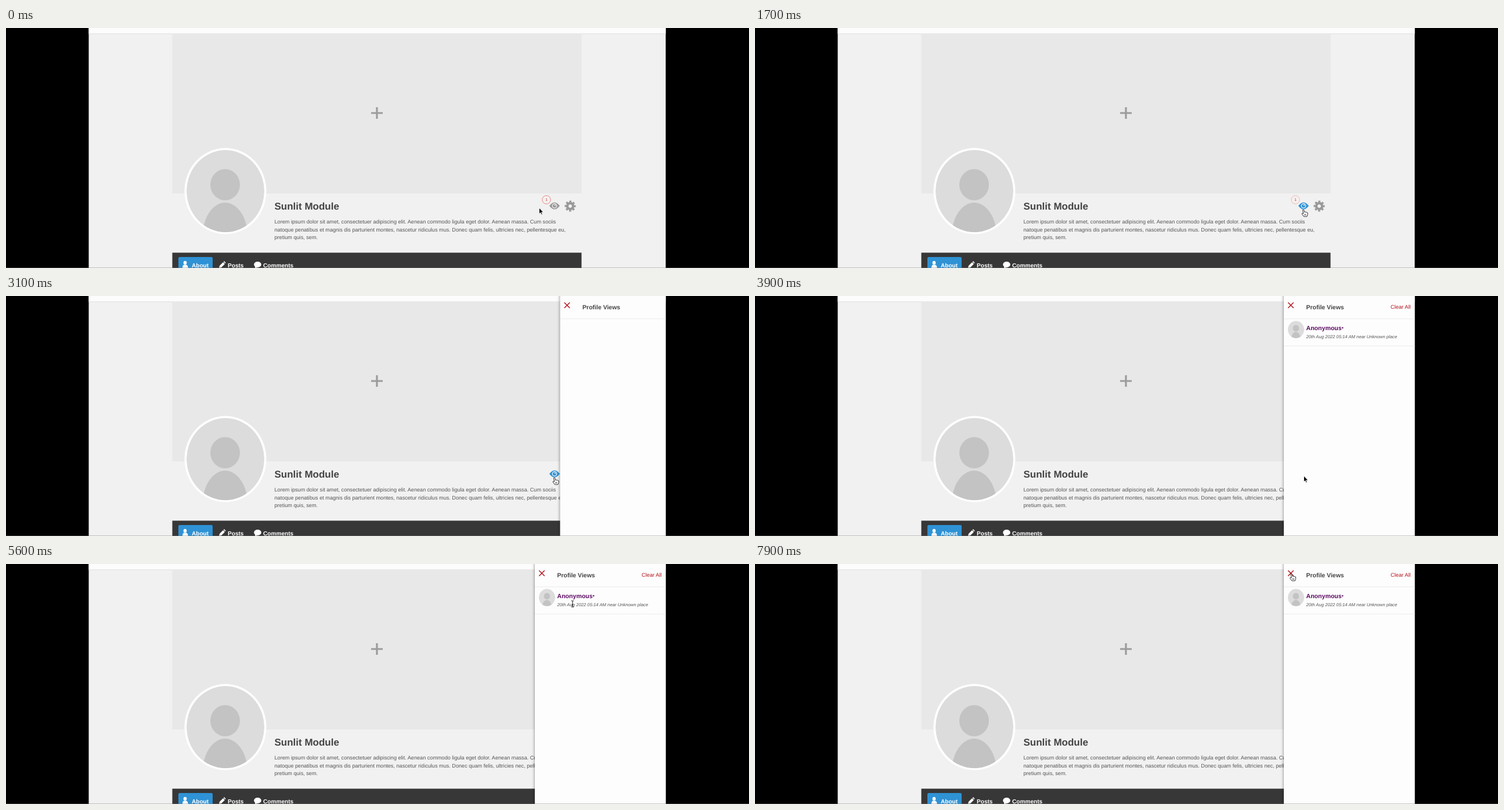
An HTML page that plays this animation: 1280 px wide and 415 px high, repeating every 8 s.

```html
<!DOCTYPE html>
<html lang="en">
<head>
<meta charset="utf-8">
<title>Profile views</title>
<style>
  html, body { margin: 0; width: 100%; height: 100%; overflow: hidden; background: #000; }
  svg { display: block; width: 1280px; height: 415px; }
  text { font-family: "Liberation Sans", Arial, sans-serif; text-rendering: geometricPrecision; fill: #444; }
  .bold { font-weight: bold; }
  .copy { font-size: 9.14px; fill: #555; }
  .tab { font-size: 10.1px; font-weight: bold; fill: #fff; }
</style>
</head>
<body>
<svg viewBox="0 0 1280 415">
  <defs>
    <clipPath id="page"><rect x="142.500" width="994" height="415"/></clipPath>
    <clipPath id="face"><ellipse rx="67" ry="71"/></clipPath>
    <filter id="shadow" x="-10%" y="-5%" width="120%" height="110%"><feGaussianBlur stdDeviation="2.5"/></filter>
    <g id="person" clip-path="url(#face)">
      <ellipse rx="67" ry="71" fill="#dcdcdc"/>
      <ellipse cx="-.5" cy="-11" rx="25.5" ry="27" fill="#c3c3c3"/>
      <ellipse cx="-.5" cy="79" rx="39" ry="59" fill="#c3c3c3"/>
    </g>
  </defs>
  <rect width="1280" height="415"/>
  <g clip-path="url(#page)">
    <rect x="142" width="996" height="415" fill="#f1f1f1"/>
    <rect x="142" width="996" height="9.5" fill="#fcfcfc"/>
    <rect x="142" y="9.5" width="996" height="1" fill="#e2e2e2"/>
    <rect x="286.500" y="10" width="705" height="276" fill="#e8e8e8"/>
    <path d="M629 147h20M639 137v20" stroke="#9b9b9b" stroke-width="3.2"/>
    <ellipse cx="378" cy="282" rx="70.5" ry="74.5" fill="#fff"/>
    <use href="#person" x="378" y="282"/>

    <text class="bold" x="462.5" y="314" font-size="17">Sunlit Module</text>
    <text class="copy" x="462.5" y="338">Lorem ipsum dolor sit amet, consectetuer adipiscing elit. Aenean commodo ligula eget dolor. Aenean massa. Cum sociis</text>
    <text class="copy" x="462.5" y="351.5">natoque penatibus et magnis dis parturient montes, nascetur ridiculus mus. Donec quam felis, ultricies nec, pellentesque eu,</text>
    <text class="copy" x="462.5" y="365">pretium quis, sem.</text>

    <g id="eye" fill="#999">
      <path d="M936 307.500Q945 295.500 954 307.500Q945 319.500 936 307.500Z"/>
      <circle cx="945" cy="307.500" r="4.400" fill="#f1f1f1"/>
      <circle cx="945" cy="307.500" r="3.100"/>
      <circle cx="946" cy="306.500" r="1.100" fill="#f1f1f1"/>
    </g>
    <g fill="none" stroke="#999" transform="translate(972 308)">
      <circle r="5.100" stroke-width="4.200"/>
      <circle r="8" stroke-width="3" stroke-dasharray="3.500 2.783" stroke-dashoffset="1.750"/>
    </g>
    <g id="badge">
      <circle id="ring" cx="931" cy="297" r="7.200" fill="#f6f0f0" stroke="#e05a5a"/>
      <text x="931" y="299.300" font-size="6.500" text-anchor="middle" style="fill:#a33">1</text>
    </g>

    <rect x="286.500" y="388.500" width="705" height="27" fill="#373737"/>
    <rect x="297" y="396" width="59" height="24" rx="2.500" fill="#2f92d5"/>
    <g fill="#fff">
      <ellipse cx="308.500" cy="406" rx="2.800" ry="3.300"/>
      <path d="M304 415Q304 409.500 307 409.500h3Q313.500 409.500 313.500 415Z"/>
      <path d="M367 415l1-4 6-6 3 3-6 6zM374.700 404.300l1.200-1.200 2.800 2.800-1.200 1.200z"/>
      <ellipse cx="433.500" cy="409" rx="6.300" ry="4.900"/>
      <path d="M429 411v4h2l4-2z"/>
    </g>
    <text class="tab" x="320" y="413.500">About</text>
    <text class="tab" x="382" y="413.500">Posts</text>
    <text class="tab" x="443" y="413.500">Comments</text>

    <g id="panel">
      <rect y="-10" width="226" height="435" opacity=".5" filter="url(#shadow)"/>
      <rect width="226" height="415" fill="#fdfdfd"/>
      <path d="M0 39.500h226" stroke="#ececec"/>
      <path d="M7.300 11.200l9.500 9.500m0-9.500l-9.500 9.500" stroke="#b3141c" stroke-width="1.500"/>
      <text class="bold" x="38.500" y="22.500" font-size="10.500">Profile Views</text>
      <text x="184" y="22.300" font-size="9.250" style="fill:#b3141c">Clear All</text>
      <g id="visit">
        <path d="M0 86.500h226" stroke="#ececec"/>
        <use href="#person" transform="translate(21 58) scale(.21)"/>
        <text class="bold" x="38.500" y="58.700" font-size="10.600" style="fill:#5c0a62">Anonymous</text>
        <circle cx="101.300" cy="55" r="1.200" fill="#5c0a62"/>
        <text x="38.500" y="73" font-size="7.700" font-style="italic" style="fill:#555">20th Aug 2022 05:14 AM near Unknown place</text>
      </g>
    </g>
  </g>
  <rect y="414" width="1280" height="1" fill="#777" opacity=".4"/>

  <g id="cursor">
    <path id="arrow" d="M0 0V10.500L2.400 8.300 4 12 5.700 11.300 4.100 7.700H7.300Z" stroke="#fff" stroke-width=".8"/>
    <path id="hand" d="M-1 1Q0-.5 1 1L2.300 5Q3.500 3.800 4.200 5 5.300 4.200 6 5.500 7.300 5 7.500 6.500L7.600 9 6.300 12.500H1L-2.500 8Q-2.500 6.300-.3 7.200L.3 7.500ZM2.300 8.500v2M4.200 8.500v2" fill="#fff" stroke="#111" stroke-width=".9"/>
    <path id="beam" d="M-2 1.500Q0 1.500 0 2.500 0 1.500 2 1.500M0 2.500V11.500M-2 12.500Q0 12.500 0 11.500 0 12.500 2 12.500M-1.300 8.500H1.300" fill="none" stroke="#111"/>
  </g>
</svg>
<script>
const LOOP = 8000, STEP = 100;
const $ = id => document.getElementById(id);
const show = (id, on) => $(id).style.display = on ? "" : "none";
const clamp = v => Math.max(0, Math.min(1, v));
const smooth = p => p * p * (3 - 2 * p);

// time, x, y of the pointer's hot spot
const route = [
  [0, 918.5, 311], [700, 952, 312], [1100, 944.5, 313.500], [3800, 944.5, 313.500],
  [3900, 945.500, 311], [4200, 949, 285], [4400, 949, 285], [4900, 947.500, 61.500],
  [5200, 947.500, 61.500], [5600, 976, 62], [6900, 976, 62], [7700, 933, 17], [7900, 924, 16.500]
];
// time from which each pointer shape shows
const shapes = [[0, "arrow"], [500, "hand"], [3900, "arrow"], [4800, "beam"], [6500, "arrow"], [7800, "hand"]];

function pointerAt(t) {
  const i = route.findIndex(k => k[0] > t);
  if (i < 0) return route.at(-1).slice(1);
  const [a, b] = [route[i - 1], route[i]];
  const p = smooth((t - a[0]) / (b[0] - a[0]));
  return [1, 2].map(n => a[n] + (b[n] - a[n]) * p);
}

// CSS "ease": cubic-bezier(.25, .1, .25, 1)
function ease(x) {
  const curve = (u, a, b) => 3 * u * (1 - u) ** 2 * a + 3 * u * u * (1 - u) * b + u ** 3;
  let lo = 0, hi = 1;
  for (let i = 0; i < 20; i++) {
    const mid = (lo + hi) / 2;
    if (curve(mid, .25, .25) < x) lo = mid; else hi = mid;
  }
  return curve(lo, .1, 1);
}

function draw(now) {
  const t = Math.floor(now % LOOP / STEP) * STEP;
  const open = ease(clamp((t - 2898) / 400));
  $("panel").setAttribute("transform", `translate(${1137 - 226 * open} 0)`);
  show("panel", t > 2900);
  show("visit", t >= 3200);

  show("badge", t < 2800);
  $("ring").setAttribute("stroke-opacity", .45 + .25 * Math.cos(t / 1000 * 2 * Math.PI));
  $("eye").setAttribute("fill", t < 500 ? "#999" : "#2f92d5");

  const shape = shapes.findLast(s => s[0] <= t)[1];
  for (const id of ["arrow", "hand", "beam"]) show(id, id === shape);
  $("cursor").setAttribute("transform", `translate(${pointerAt(t)})`);
  requestAnimationFrame(draw);
}
requestAnimationFrame(draw);
</script>
</body>
</html>
```
